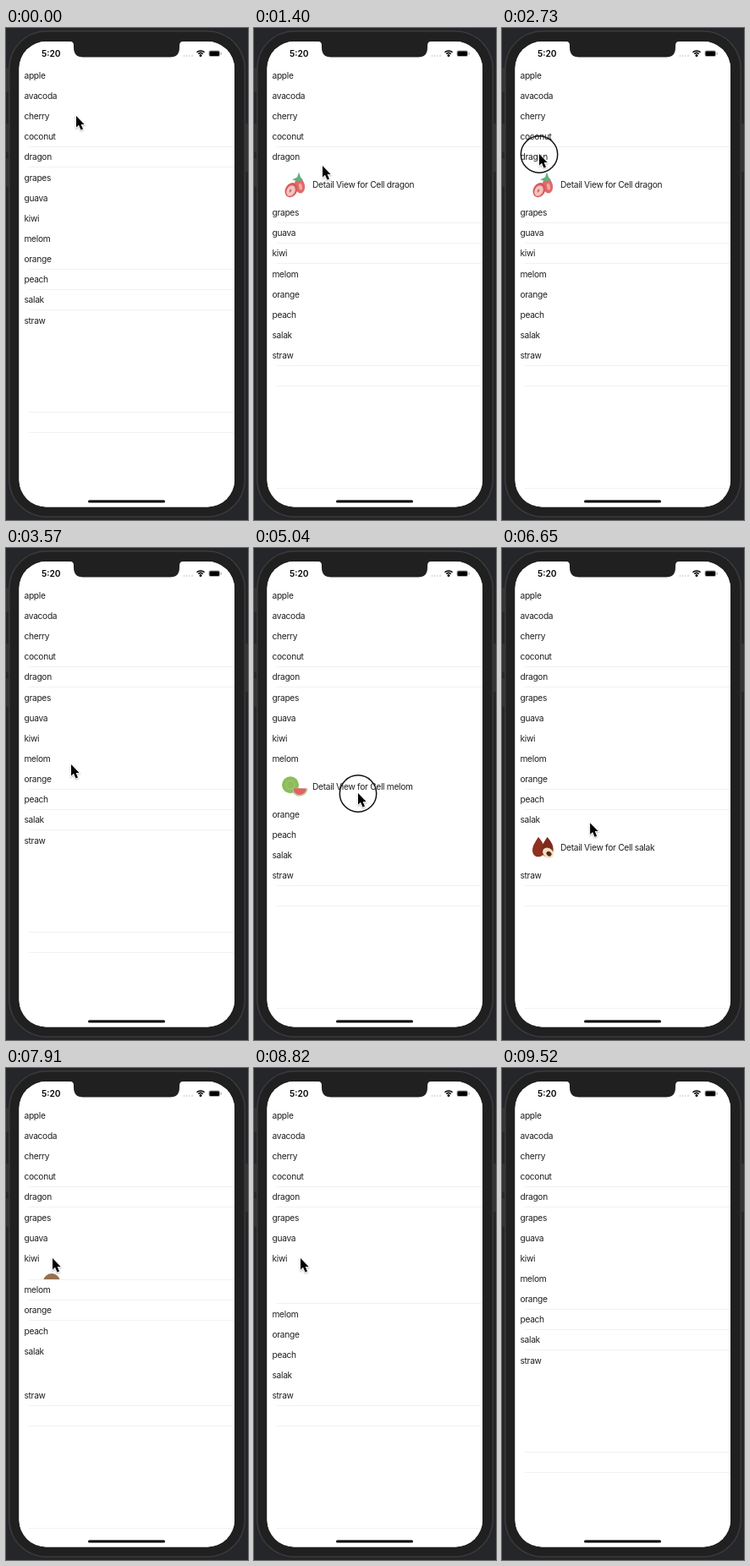
These frames come from a looping animation (286x582 px, 9800 ms). An HTML page with a canvas:

```html
<!DOCTYPE html>
<html lang="en">
<head>
<meta charset="utf-8">
<style>
  html, body { margin: 0; width: 100%; height: 100%; overflow: hidden; background: #25262a; }
  canvas { display: block; }
</style>
</head>
<body>
<canvas id="stage" width="286" height="582"></canvas>
<script>
const ctx = document.getElementById('stage').getContext('2d');
const LOOP = 9800, STEP = 70, SLIDE = 350, RING = 210;
const FRUITS = ['apple', 'avacoda', 'cherry', 'coconut', 'dragon', 'grapes', 'guava',
  'kiwi', 'melom', 'orange', 'peach', 'salak', 'straw'];
const ROWS = 21, ROW = 24.155, LIST_TOP = 43.4, DETAIL = 41.59;

// Where the pointer goes; a press toggles the row underneath
const visits = [
  { x: 83, y: 104, arrive: 0, travel: 1 },
  { x: 81, y: 163, arrive: 280, travel: 280, press: 700 },
  { x: 79, y: 267, arrive: 1820, travel: 420 },
  { x: 44, y: 149, arrive: 2590, travel: 700, press: 2870 },
  { x: 77, y: 256, arrive: 3570, travel: 280, press: 3920 },
  { x: 123, y: 290, arrive: 4690, travel: 350, press: 5250 },
  { x: 106, y: 329, arrive: 6020, travel: 280, press: 6300 },
  { x: 55, y: 225, arrive: 7490, travel: 950, press: 7770 },
  { x: 55, y: 225, arrive: 8610, travel: 70, press: 8820 },
  { x: 152, y: 496, arrive: 9450, travel: 210 }
];
const presses = visits.filter(visit => visit.press);

const clamp = v => Math.min(1, Math.max(0, v));
const smooth = u => u * u * (3 - 2 * u);
const easeInOut = u => u < 0.5 ? 2 * u * u : 1 - 2 * (1 - u) ** 2;

function rowAt(y, openRow) {
  const index = (y - LIST_TOP) / ROW;
  const below = openRow !== null && index > openRow;
  return Math.floor(below ? Math.max(openRow, index - DETAIL / ROW) : index);
}

// Open row and heights of all detail panels; only one row stays open
function listState(t) {
  const heights = Array(ROWS).fill(0);
  let openRow = null;
  for (const { y, press } of presses) {
    if (t < press) break;
    const amount = DETAIL * easeInOut(clamp((t - press) / SLIDE));
    const row = rowAt(y, openRow);
    if (openRow !== null) heights[openRow] -= amount;
    openRow = row === openRow ? null : row;
    if (openRow !== null) heights[openRow] += amount;
  }
  return { openRow, heights };
}

function shape(color, build) {
  ctx.beginPath();
  build();
  ctx.fillStyle = color;
  ctx.fill();
}
const box = (color, x, y, w, h, r = 0) => shape(color, () => ctx.roundRect(x, y, w, h, r));
const oval = (color, x, y, rx, ry = rx, turn = 0) =>
  shape(color, () => ctx.ellipse(x, y, rx, ry, turn, 0, 2 * Math.PI));
const half = (color, x, y, r) => shape(color, () => ctx.arc(x, y, r, 0.05, Math.PI));
const path = (color, d) => { ctx.fillStyle = color; ctx.fill(new Path2D(d)); };
function arc(color, width, x, y, r, from = 0, to = 2 * Math.PI) {
  ctx.beginPath();
  ctx.arc(x, y, r, from, to);
  ctx.strokeStyle = color;
  ctx.lineWidth = width;
  ctx.stroke();
}

function label(text, x, middle, weight = 400, spacing = -0.3) {
  ctx.font = `${weight} 10.2px Inter, sans-serif`;
  ctx.letterSpacing = spacing + 'px';
  ctx.fillStyle = weight > 400 ? '#000' : '#1e1e1e';
  ctx.fillText(text, x, middle + 4.3);
}

// Icons sit around (48, 0), the middle of a detail panel
const icons = {
  dragon() {
    oval('#e0696b', 54, 1, 6, 9, -0.2);
    oval('#f0a5a0', 55, 2, 2, 4, -0.2);
    path('#62b07c', 'M45-6 L51-9 L53-15 L55-9 L58-6 L53-4Z');
    oval('#d65a5f', 44, 6, 7, 9, 0.5);
    oval('#f3c2bc', 43.5, 7, 4.8, 6.6, 0.5);
    oval('#bb6a6c', 43, 7, 1, 2, 0.5);
  },
  melom() {
    oval('#8dbd5b', 43, -2, 10);
    arc('#a6cd78', 1, 43, -2, 5);
    half('#7fae61', 54, 2, 9.3);
    half('#e8e6c8', 54, 2, 8.6);
    half('#df6265', 54, 2, 7.9);
  },
  salak() {
    const drop = 'M43-13 C47-8 51-3 50 4 C49 13 36 13 36 3 C36-3 40-8 43-13Z';
    path('#8f3120', drop);
    ctx.save();
    ctx.translate(10.5, 0);
    path('#7d2a1c', drop);
    ctx.restore();
    oval('#f0dfc0', 54.5, 6, 7, 5.6, 0.7);
    oval('#572619', 55.5, 7, 3.2, 2.6, 0.7);
  },
  kiwi() {
    oval('#96714f', 54, -5, 10);
    oval('#8a6848', 45, 4, 9);
    oval('#93bb4b', 45, 4, 7.8);
    oval('#e9edc4', 45, 4, 2.6);
  }
};

const screen = color => box(color, 15.5, 16, 254.5, 550.5, 32);

function drawPhone() {
  box('#25262a', 0, 0, 286, 582);
  box('#343437', 0, 47, 5, 29, 1);
  box('#343437', 0, 113, 5, 34, 1);
  box('#343437', 0, 154, 5, 34, 1);
  box('#343437', 281, 113, 5, 57, 1);
  box('#3a3a3c', 3, 3, 280, 576, 45);
  box('#202021', 4.5, 4.5, 277, 573, 43.5);
  screen('#fff');
}

function drawStatus() {
  path('#202021', 'M76 15 V16 Q80 16 80 21 V23 Q80 34.5 91 34.5 H194 Q205 34.5 205 23 V21 Q205 16 209 16 V15Z');
  label('5:20', 42, 30, 600, 0);
  for (let i = 0; i < 4; i++) oval('#bbb', 210.5 + i * 3.2, 33, 0.8);
  oval('#000', 230, 32.6, 1.5);
  for (const r of [4, 6.7]) arc('#000', 1.5, 230, 33.6, r, -2.32, -0.82);
  box('#aaa', 239.5, 26.5, 13.5, 7.5, 2.2);
  box('#000', 240.5, 27.5, 11.5, 5.5, 1.2);
  box('#aaa', 253.6, 28.8, 1.2, 3, 0.6);
  box('#000', 97, 558.5, 91, 3, 1.5);
}

function drawDetail(name, top, height, middle) {
  ctx.save();
  ctx.beginPath();
  ctx.rect(15, top, 255, height);
  ctx.clip();
  label('Detail View for Cell ' + name, 69, middle);
  ctx.translate(0, middle + 0.5);
  icons[name]();
  ctx.restore();
}

function drawList(t) {
  const { openRow, heights } = listState(t);
  ctx.save();
  screen('#fff');
  ctx.clip();
  let top = LIST_TOP;
  heights.forEach((height, row) => {
    const middle = top + ROW / 2, bottom = top + ROW + height;
    // Hairlines only survive downscaling near whole pixels
    const pixel = Math.round(bottom), off = bottom - pixel;
    if (off > -0.12 && off < 0.3) box('#f1f1f1', 27, pixel, 243, 1);
    if (row < FRUITS.length) label(FRUITS[row], 21.5, middle);
    if (row === openRow) drawDetail(FRUITS[row], middle + 5, bottom - middle - 5, middle + 33);
    top = bottom;
  });
  ctx.restore();
}

function drawPointer(t) {
  if (t > visits.at(-1).arrive) return;
  let x = 0, y = 0;
  for (const visit of visits) {
    const u = smooth(clamp((t - visit.arrive) / visit.travel + 1));
    x += (visit.x - x) * u;
    y += (visit.y - y) * u;
  }
  ctx.save();
  ctx.translate(x, y);
  if (presses.some(({ press }) => t >= press - RING && t < press)) arc('#111', 1.5, 0, 0.5, 21.7);
  const arrow = new Path2D('M0 0 V13.6 L3 10.8 L5.5 16.5 L8 15.5 L5.6 9.9 H9.6Z');
  ctx.shadowColor = 'rgba(0,0,0,.3)';
  ctx.shadowBlur = 2;
  ctx.shadowOffsetY = 1;
  ctx.strokeStyle = '#fff';
  ctx.lineWidth = 1.6;
  ctx.stroke(arrow);
  ctx.shadowColor = 'transparent';
  ctx.fillStyle = '#000';
  ctx.fill(arrow);
  ctx.restore();
}

function draw() {
  const t = Math.floor(performance.now() % LOOP / STEP) * STEP;
  drawPhone();
  drawList(t);
  drawStatus();
  drawPointer(t);
  requestAnimationFrame(draw);
}
draw();
</script>
</body>
</html>
```
